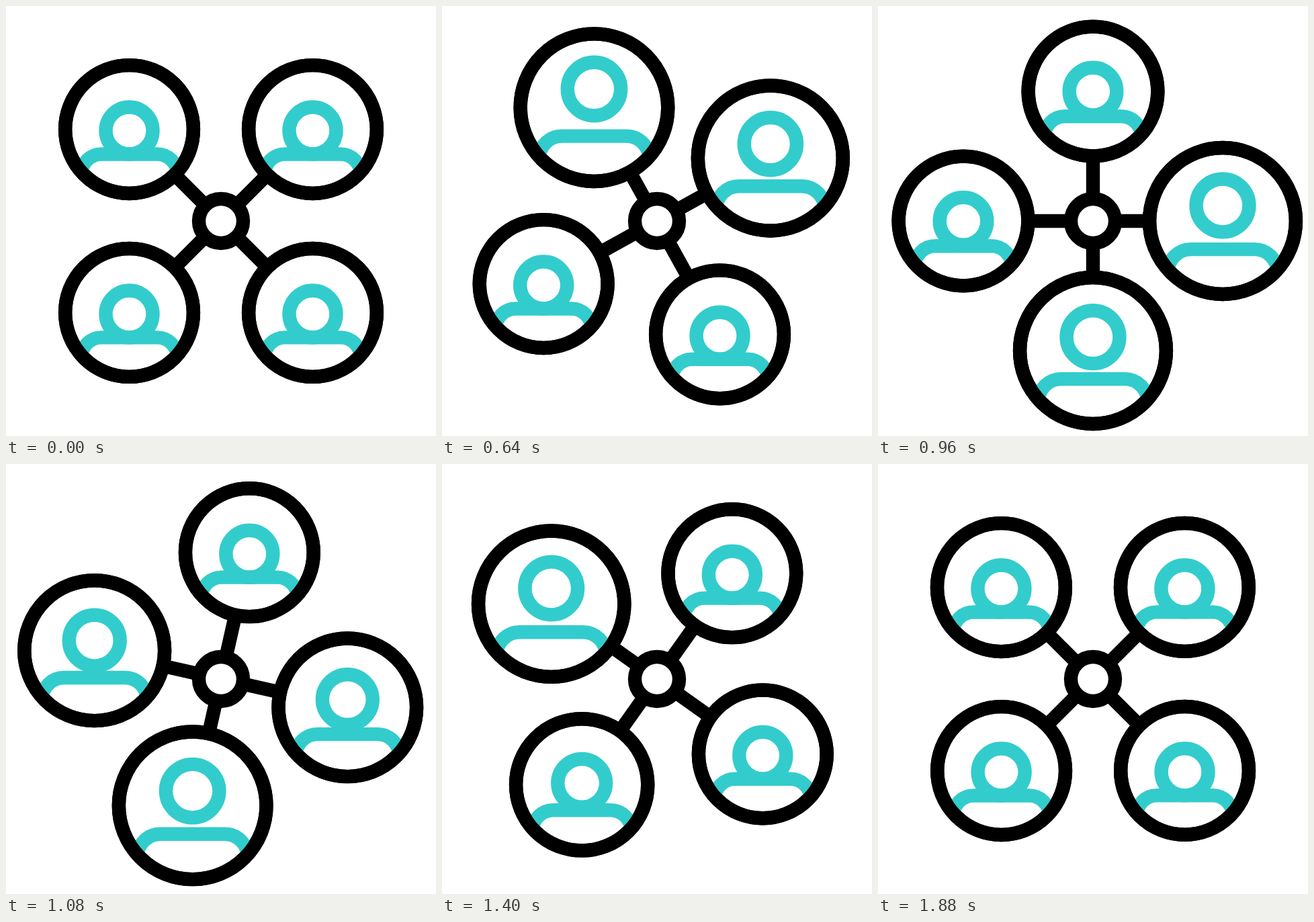
Recreate the animation shown at these times as an HTML page with a canvas. Size 640 px wide and 640 px high, loop 1920 ms.

```html
<!DOCTYPE html>
<html lang="en">
<head>
<meta charset="utf-8">
<title>Connected people</title>
<style>
  html, body { margin: 0; width: 100%; height: 100%; overflow: hidden; background: #fff; }
  canvas { display: block; width: 100vmin; height: 100vmin; }
</style>
</head>
<body>
<canvas id="stage" width="640" height="640"></canvas>
<script>
const ctx = document.getElementById('stage').getContext('2d');
const LOOP = 1920, STEP = 40;
const BLACK = '#000', TEAL = '#33cccc';
const ORBIT = 193, RING = 95.4, STROKE = 20.4;

// Growth window of each person (ms) and how far the head lifts (px)
const people = [
  { rise: [0, 660], fall: [680, 1040], lift: 30 },
  { rise: [335, 765], fall: [870, 1295], lift: 27 },
  { rise: [625, 1050], fall: [1110, 1550], lift: 24 },
  { rise: [880, 1240], fall: [1240, 1920], lift: 27.5 }
];

// Symmetric cubic bezier (a, 0, 1 - a, 1)
function ease(x) {
  if (x <= 0) return 0;
  if (x >= 1) return 1;
  const a = 0.57;
  let lo = 0, hi = 1;
  for (let i = 0; i < 30; i++) {
    const s = (lo + hi) / 2, q = 1 - s;
    const bx = 3 * s * q * q * a + 3 * s * s * q * (1 - a) + s * s * s;
    if (bx < x) lo = s; else hi = s;
  }
  return lo * lo * (3 - 2 * lo);
}

const between = (t, [from, to]) => ease((t - from) / (to - from));

function circle(x, y, r, color, fill) {
  ctx.beginPath();
  ctx.arc(x, y, r, 0, Math.PI * 2);
  if (fill) {
    ctx.fillStyle = fill;
    ctx.fill();
  }
  ctx.strokeStyle = color;
  ctx.stroke();
}

function shoulders(k) {
  const half = 41.5 * k, top = 36.9 * k, r = 30 * k;
  ctx.beginPath();
  ctx.arc(-half, top + r, r, Math.PI, Math.PI * 1.5);
  ctx.arc(half, top + r, r, Math.PI * 1.5, Math.PI * 2);
  ctx.strokeStyle = TEAL;
  ctx.stroke();
}

function drawPerson(p, x, y, t) {
  const grow = between(t, p.rise) - between(t, p.fall);
  const k = 1 + 0.151 * grow;
  const r = RING * k;

  ctx.beginPath();
  ctx.moveTo(320, 320);
  ctx.lineTo(x, y);
  ctx.strokeStyle = BLACK;
  ctx.stroke();

  ctx.save();
  ctx.translate(x, y);
  circle(0, 0, r, BLACK, '#fff');
  ctx.save();
  ctx.beginPath();
  ctx.arc(0, 0, r, 0, Math.PI * 2);
  ctx.clip();
  shoulders(k);
  circle(0, 2 * k - p.lift * grow, 35 * (1 + 0.135 * grow), TEAL);
  ctx.restore();
  circle(0, 0, r, BLACK);
  ctx.restore();
}

function draw(t) {
  ctx.fillStyle = '#fff';
  ctx.fillRect(0, 0, 640, 640);
  ctx.lineWidth = STROKE;
  const turn = ease(t / LOOP) * Math.PI / 2;
  people.forEach((p, i) => {
    const angle = turn + (i - 1.5) * Math.PI / 2;
    drawPerson(p, 320 + ORBIT * Math.cos(angle), 320 + ORBIT * Math.sin(angle), t);
  });
  circle(320, 320, 33, BLACK, '#fff');
}

// First person starts at the upper left
const start = performance.now();
function tick() {
  const t = (performance.now() - start) % LOOP;
  draw(Math.floor(t / STEP) * STEP);
  requestAnimationFrame(tick);
}
tick();
</script>
</body>
</html>
```
